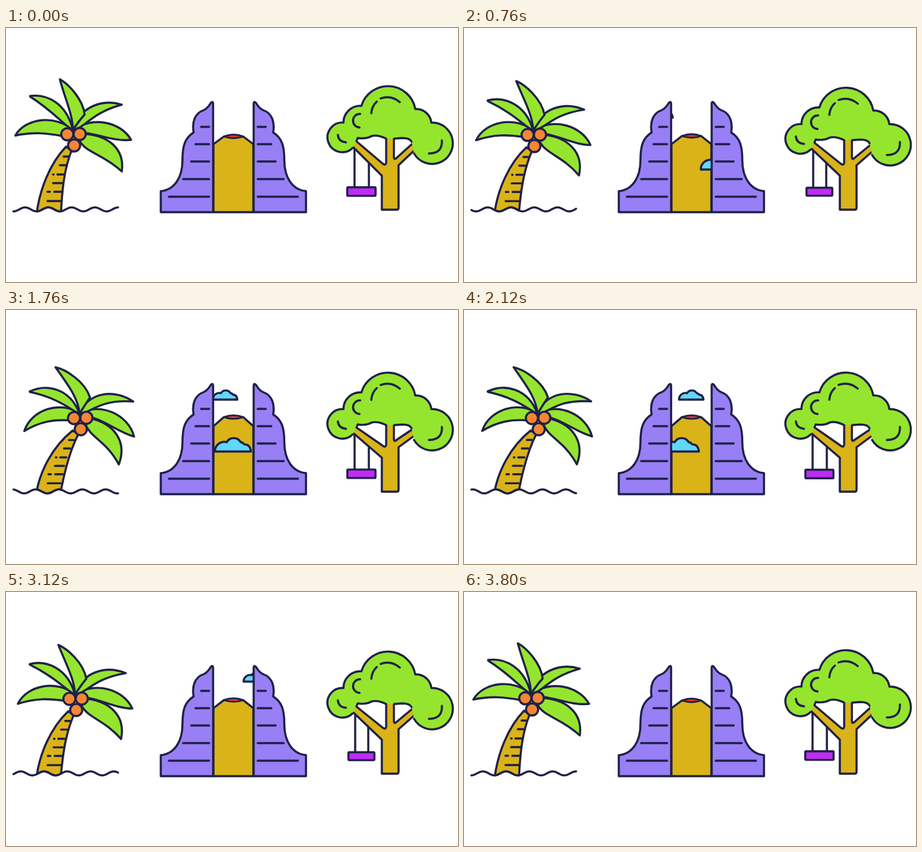
Recreate the animation shown at these times as an HTML page. Size 730x411 px, loop 3.84 s.

```html
<!DOCTYPE html>
<html lang="en">
<head>
<meta charset="utf-8">
<title>Island icons</title>
<style>
  html, body { margin: 0; width: 100%; height: 100%; overflow: hidden; background: #fff; }
  svg { display: block; width: 730px; height: 411px; }
  .ink { stroke: #1f2147; stroke-width: 3.4; stroke-linecap: round; stroke-linejoin: round; fill: none; }
  .leaf { fill: #95e52e; }
  .wood { fill: #dab318; }
  .stone { fill: #987ff5; }
  .nut { fill: #f58634; }
  .sky { fill: #5fd8fb; }
  .lava { fill: #e8382f; stroke-width: 2.8; }
  .seat { fill: #c02bf6; }
</style>
</head>
<body>
<svg viewBox="0 0 730 411">
  <defs>
    <clipPath id="gap"><rect x="335" y="100" width="64.5" height="198"/></clipPath>
    <g id="half">
      <path class="ink stone" d="M250 298V264C272 262 285 242 285 214C285 190 289 178 303 169C300 152 305 138 319 133C326 130 328 125 331 121Q334 118 334.5 122V298Z"/>
      <path class="ink" d="M315 160H328M306 188H328M299 216H328M286 244.5H328M263 273H328"/>
    </g>
  </defs>

  <g id="palm">
    <path id="trunk" class="ink wood"/>
    <path id="rings" class="ink"/>
    <g id="crown">
      <g id="fronds"></g>
      <circle class="ink nut" cx="99" cy="172" r="9.8"/>
      <circle class="ink nut" cx="119" cy="171.5" r="9.8"/>
      <circle class="ink nut" cx="110" cy="190" r="9.8"/>
    </g>
    <path id="wave" class="ink"/>
  </g>

  <g id="gate">
    <path id="hill" class="ink wood"/>
    <path id="crater" class="ink lava" d="M352 175.5Q367.5 169.5 383 175.5Q367.5 181 352 175.5Z"/>
    <g clip-path="url(#gap)">
      <path id="high" class="ink sky" d="M0 0A10.5 10.5 0 0 1 13 -10.5A9 9 0 0 1 28.5 -10.5A6 6 0 0 1 32.5 -8Q38.5 -8 39.5 0Z"/>
      <path id="low" class="ink sky" d="M0 0A15.2 15.2 0 0 1 19 -15.2A13 13 0 0 1 41.5 -15.2A8.7 8.7 0 0 1 47.2 -11.6Q57 -11.6 58 0Z"/>
    </g>
    <use href="#half"/>
    <use href="#half" transform="matrix(-1 0 0 1 734.5 0)"/>
  </g>

  <g id="tree">
    <path id="ropes" class="ink"/>
    <rect id="seat" class="ink seat" rx="1.5"/>
    <path id="boughs" class="ink wood"/>
    <g id="canopy">
      <path class="leaf" d="M560 194A24 24 0 1 1 545 153A27 27 0 0 1 574 126A44.800 44.800 0 0 1 661 131A25 25 0 0 1 687 153A33.500 33.500 0 1 1 659 203L655 184Q652 178 640 178L627 179H614Q600 172 590 175Q582 180 568 178L566 183Z"/>
      <path class="ink" d="M560 194A24 24 0 1 1 545 153A27 27 0 0 1 574 126A44.800 44.800 0 0 1 661 131A25 25 0 0 1 687 153A33.500 33.500 0 1 1 659 203"/>
      <path class="ink" d="M566 183L568 178Q582 180 590 175Q600 172 614 179M627 179L640 178Q652 178 655 184"/>
      <path class="ink" d="M536 173Q537 184 549 185M572 139A11 11 0 0 0 571 161M590 138Q591 126 599 119M605 114Q622 108 636 120M704 182Q705 203 683 203"/>
    </g>
  </g>
</svg>
<script>
const LOOP = 3840, STEP = 40, TAU = Math.PI * 2;
const $ = id => document.getElementById(id);
const set = (id, attrs) => {
  for (const k in attrs) $(id).setAttribute(k, attrs[k]);
};

// each frond: outline and the droop of its tip in degrees
const fronds = [
  ["M187 232C192 196 166 172 120 171L118 181C128 202 156 203 187 232Z", 10.8],
  ["M202 181C186 152 140 142 108 165L128 170C150 172 176 184 202 181Z", 12.8],
  ["M187 124C155 114 118 128 108 165C128 162 136 138 187 124Z", 15.3],
  ["M15 174C32 145 80 140 108 165L92 175C66 170 44 168 15 174Z", -11.8],
  ["M39 110C66 106 98 122 108 165C94 158 78 136 39 111Z", -15.3],
  ["M87 83C100 90 124 114 127 140Q118 150 108 165C108 140 95 114 87 83Z", -14.3]
].map(([shape, droop]) => {
  const el = document.createElementNS("http://www.w3.org/2000/svg", "path");
  el.setAttribute("class", "ink leaf");
  $("fronds").append(el);
  return { el, shape, droop };
});

// turns every point around the crown, more so the farther out it lies
function bendFrond(shape, degrees) {
  return shape.replace(/([\d.]+) ([\d.]+)/g, (_, px, py) => {
    const x = px - 108, y = py - 165;
    const a = degrees * Math.PI / 180 * Math.hypot(x, y) / 92;
    const c = Math.cos(a), s = Math.sin(a);
    return `${(108 + x * c - y * s).toFixed(2)} ${(165 + x * s + y * c).toFixed(2)} `;
  });
}

// trunk rings: y, then start and end x of each dash
const rings = [
  [208, 93, 101], [222, 87, 97], [237, 76, 77, 83, 93],
  [251, 76, 91], [265, 67, 71, 78, 90], [280, 67, 88]
];

function line(from, to, height) {
  let d = "";
  for (let x = from; x <= to; x++) d += `L${x} ${height(x).toFixed(2)}`;
  return "M" + d.slice(1);
}

function drawPalm(p, s) {
  const water = x => 293.5 + 3.2 * Math.cos(TAU * ((x - 12) / 37.6 - p));
  const bend = y => 11 * s * ((295 - y) / 100) ** 1.6;
  const dx = 11 * s, dy = 3 * s;
  set("wave", { d: line(12, 181, water) });
  set("trunk", {
    d: line(50, 89, water) +
      `C${91 + 5 * s} 255 ${95 + 9 * s} 226 ${106 + dx} ${198 + dy}` +
      `L${97 + dx} ${192 + dy}C${70 + 3 * s} ${220 + dy} ${55 + s} 262 50 ${water(50)}Z`
  });
  let d = "";
  for (const [y, ...xs] of rings)
    for (let i = 0; i < xs.length; i += 2)
      d += `M${xs[i] + bend(y)} ${y + dy * (295 - y) / 110}H${xs[i + 1] + bend(y)}`;
  set("rings", { d });
  set("crown", { transform: `translate(${dx} ${dy})` });
  for (const { el, shape, droop } of fronds)
    el.setAttribute("d", bendFrond(shape, droop * s));
}

function drawGate(t, s) {
  const rise = 2.2 * s, top = 175.5 - rise;
  set("hill", { d: `M335 298V188L352 ${top}H383L399.5 188V298Z` });
  set("crater", { transform: `translate(0 ${-rise})` });
  set("high", { transform: `translate(${321 + 0.0365 * (t - 1400)} 145)` });
  set("low", { transform: `translate(${382.5 - 0.045 * (t - 760)} 229)` });
}

function drawTree(p, s) {
  const c = Math.cos(TAU * 2 * p), sink = 7.4 * s;
  const w = 43.5 + 2.3 * c, h = 13.3 + 0.6 * c, half = 11 + 0.6 * c;
  const y = 257.7 + 6 * (1 - c * c) ** 2;
  set("canopy", { transform: `translate(0 ${sink})` });
  set("boughs", {
    d: `M607 294V239L554 ${186 + sink}L562 ${180 + sink}L609 220Q614 223 614 217V165` +
      `H626.5V209Q627 214 631 210L662 ${182 + sink}L669 ${189 + sink}L634 222V291` +
      "Q634 294 631 294H609Q607 294 607 291Z"
  });
  set("seat", { x: 574 - w / 2, y, width: w, height: h });
  set("ropes", { d: `M${574.5 - half} 194V${y}M${574.5 + half} 212V${y}` });
}

function draw(ms) {
  const t = Math.floor((ms % LOOP) / STEP) * STEP;
  const p = t / LOOP, sway = (1 - Math.cos(TAU * p)) / 2;
  drawPalm(p, sway);
  drawGate(t, sway);
  drawTree(p, sway);
}

let start;
function tick(now) {
  start ??= now;
  draw(now - start);
  requestAnimationFrame(tick);
}
draw(0);
requestAnimationFrame(tick);
</script>
</body>
</html>
```
